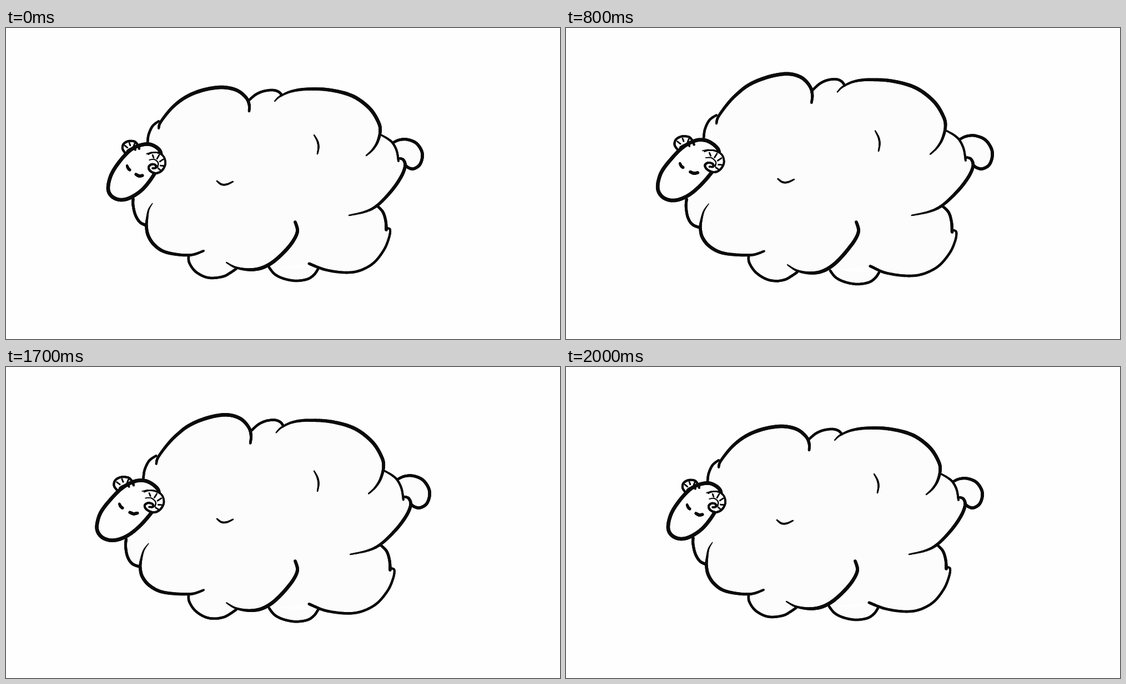
An HTML page with a canvas for the animation above (2.1 s loop, 998 px wide and 561 px high).

```html
<!DOCTYPE html>
<html lang="en">
<head>
<meta charset="utf-8">
<title>Breathing sheep</title>
<style>
html, body { margin: 0; width: 100%; height: 100%; overflow: hidden; background: #fefefe; }
canvas { display: block; width: 998px; height: 561px; }
</style>
</head>
<body>
<canvas id="stage" width="998" height="561"></canvas>
<script>
const ctx = document.getElementById('stage').getContext('2d');
const INK = '#0b0b0b', WOOL = '#fcfcfc', PAPER = '#fefefe';
const LOOP = 2100, STEP = 100;

// front: head reach, up: back rises, low: belly sinks, back: tail reach
const poses = [
  { front: 0, up: 0, low: 0, back: 0 },
  { front: 18, up: .12, low: 0, back: 7 },
  { front: 22, up: .68, low: 0, back: 10 },
  { front: 20.5, up: .85, low: .55, back: 13 },
  { front: 19, up: .93, low: 1, back: 16 },
  { front: 19, up: .97, low: 1, back: 18 },
  { front: 19, up: 1, low: 1, back: 19 }
];

const unit = v => Math.max(0, Math.min(1, v));

function warp([x, y], { front, up, low, back }) {
  const reach = front / 19;
  const nose = unit((310 - x) / 127) ** 1.2;
  const chest = unit((y - 300) / 45) * unit((312 - x) / 60);
  const middle = unit((x - 330) / 60);
  const crown = unit((560 - x) / 130) * unit((170 - y) / 60) * unit((x - 270) / 80);
  const dx = -front * nose - 4 * up * chest
    + middle * (4 * low - 2 * reach)
    + 8 * up * crown
    + back * unit((x - 560) / 190) ** 1.5;

  const rise = (22 - 8 * unit((x - 400) / 150)) * unit((245 - y) / 139) ** 1.3;
  const face = 6 * unit((275 - x) / 30) * unit((330 - y) / 60);
  const flank = 4 * (x > 600 ? unit((250 - y) / 50) : unit((345 - y) / 60));
  const edge = 395 - 60 * unit((x - 560) / 130);
  const sag = 6 * unit((y - edge) / 40) * unit((x - 330) / 50);
  const dy = 5.3 * reach * unit((320 - x) / 90)
    - up * (rise + face) + low * (sag - flank);
  return [x + dx, y + dy];
}

// Catmull-Rom samples through the given points
function curve(text, closed) {
  const pts = text.split(' ').map(p => p.split(',').map(Number));
  const n = pts.length;
  const at = i => closed ? pts[(i + n) % n] : pts[Math.max(0, Math.min(n - 1, i))];
  const out = [];
  for (let i = 0; i < (closed ? n : n - 1); i++) {
    const [a, b, c, d] = [at(i - 1), at(i), at(i + 1), at(i + 2)];
    for (let k = 0; k < 10; k++) {
      const t = k / 10;
      out.push([0, 1].map(j => b[j] + .5 * t * (c[j] - a[j]
        + t * (2 * a[j] - 5 * b[j] + 4 * c[j] - d[j]
        + t * (3 * (b[j] - c[j]) + d[j] - a[j])))));
    }
  }
  out.push(at(closed ? 0 : n - 1));
  return out;
}

// widths at the start, the middle and the end
const line = (text, from, mid = from, to = from) => ({ pts: curve(text), from, mid, to });

const wool = [
  line('255,206 257,192 264,177 275,168', 4.5, 4.5, 4),
  line('275,181 279,169 300,143 325,124 355,112 388,107 415,112 432,125 438,138 438,150', 4, 6.5, 4.5),
  line('438,130 450,120 464,114 480,112 491,115 497,121', 4.5),
  line('484,132 494,123 515,114 545,110 585,112 625,123 655,145 671,170 674,187 669,206 660,220 649,230', 2, 6.5, 2.5),
  line('676,193 688,200 697,208 704,222 707,240', 3, 4, 4),
  line('697,207 708,202 722,201 738,207 748,220 750,233 745,247 734,254 725,252 720,248', 4.5, 5.5, 5),
  line('709,235 716,238 719,249 712,268 695,293 670,319 648,331 618,338', 4, 6, 2.5),
  line('669,321 679,332 684,348 685,364', 4.5, 5, 5.5),
  line('687,361 692,364 690,378 681,400 662,424 636,438 609,441 575,436 546,425', 3.5, 4.5, 5),
  line('474,432 484,444 500,452 522,456 543,453 555,445 562,435', 4.5),
  line('397,423 414,432 438,436 460,433 481,422 503,402 518,383 525,366 521,350', 2, 6.5, 5.5),
  line('329,411 330,423 340,438 356,448 372,451 392,448 405,441 415,434', 4.5),
  line('264,316 257,328 254,345 253,358 256,374 266,390 284,403 312,409 336,409 356,402', 1, 6, 4),
  line('229,308 229,320 233,337 241,350 252,356', 5)
];
const marks = [
  line('380,276 388,282 398,282 409,277', 2.5, 3.5, 2.5),
  line('555,193 561,204 563,215 561,227', 2, 3.5, 2.5)
];
const core = curve('255,205 275,180 438,130 497,121 676,193 719,249 669,321 687,362 546,425 474,432 415,434 329,411 252,356 229,308', true)
  .filter((p, i) => i % 10 === 0);
const head = { pts: curve('184,290 191,304 207,310 226,305 248,289 268,262 278,238 277,221 260,210 240,212 222,222 203,243 189,266', true), from: 6.5, mid: 6.5, to: 6.5 };
const horns = [
  line('216,227 210,218 212,209 221,204 232,205 238,212 240,218', 4),
  line('256,228 263,225 274,225 284,232 287,245 281,257 270,262 260,258 257,251 262,246 269,247 270,252 264,253', 2, 4, 3.5)
];
const details = [
  line('219,222 224,219 231,217 233,220', 4.5, 5, 3),
  line('214,212 219,216', 2.5),
  line('222,207 224,212', 2.5),
  line('232,208 230,213', 2.5),
  line('253,227 262,224', 1.5),
  line('258,238 267,237 274,243 273,251', 1.5, 2, 2.5),
  line('264,229 266,234', 2.5),
  line('276,229 272,236', 2.5),
  line('283,237 277,241', 2.5),
  line('285,249 278,248', 2.5),
  line('279,257 274,253', 2.5),
  line('218,248 220,253 223,256', 3.5, 5, 5),
  line('234,264 240,267 246,266', 5, 5.5, 5)
];

function fill(pts, pose, color) {
  ctx.beginPath();
  pts.forEach(p => ctx.lineTo(...warp(p, pose)));
  ctx.fillStyle = color;
  ctx.fill();
}

function ink({ pts, from, mid, to }, pose) {
  const path = pts.map(p => warp(p, pose));
  for (let i = 1; i < path.length; i++) {
    const t = i / (path.length - 1);
    const end = t < .5 ? from : to;
    ctx.lineWidth = end + (mid - end) * Math.sin(Math.PI * t);
    ctx.beginPath();
    ctx.moveTo(...path[i - 1]);
    ctx.lineTo(...path[i]);
    ctx.stroke();
  }
}

function draw(pose) {
  ctx.fillStyle = PAPER;
  ctx.fillRect(0, 0, 998, 561);
  ctx.strokeStyle = INK;
  ctx.lineCap = ctx.lineJoin = 'round';
  fill(core, pose, WOOL);
  wool.forEach(l => fill(l.pts, pose, WOOL));
  [...wool, ...marks].forEach(l => ink(l, pose));
  fill(head.pts, pose, PAPER);
  fill(horns[0].pts, pose, PAPER);
  ink(head, pose);
  fill(horns[1].pts, pose, PAPER);
  [...horns, ...details].forEach(l => ink(l, pose));
}

// swell over six steps, rest, then shrink back the same way
function poseAt(t) {
  if (t < 500) return 0;
  if (t < 1500) return Math.min(6, Math.floor((t - 500) / STEP) + 1);
  return 5 - Math.floor((t - 1500) / STEP);
}

const start = performance.now();
function tick() {
  draw(poses[poseAt((performance.now() - start) % LOOP)]);
  requestAnimationFrame(tick);
}
tick();
</script>
</body>
</html>
```
